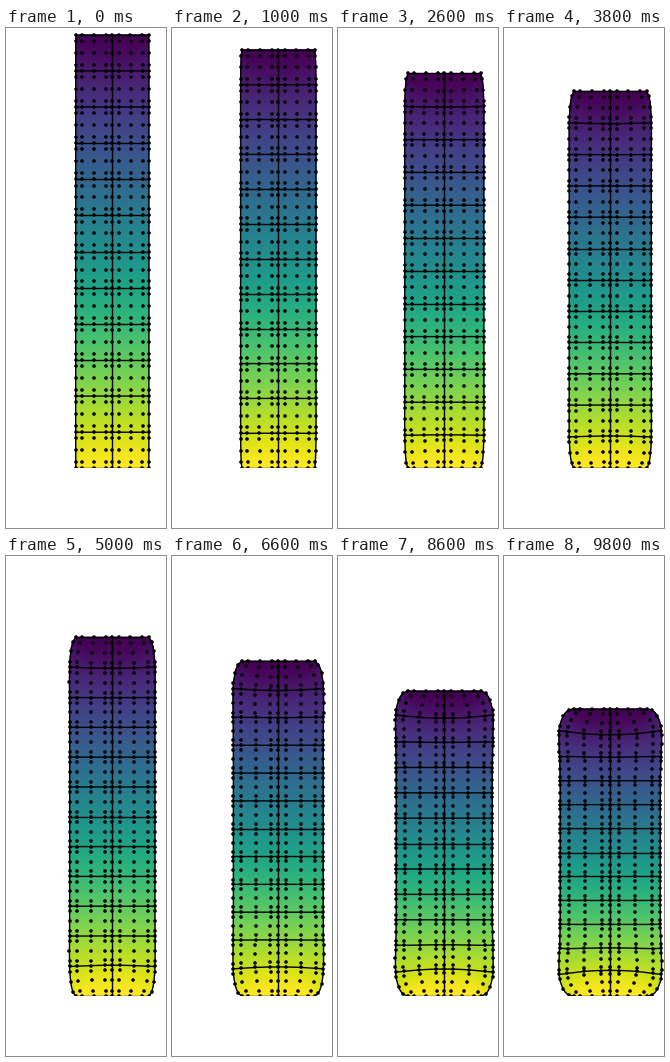
Write a matplotlib script that moves like this. It is 160x500 px and loops after 10000 ms.

```python
"""Compression of a clamped neo-Hookean block, solved with quartic spectral elements."""
import numpy as np
import matplotlib.pyplot as plt
from matplotlib.animation import FuncAnimation

W, H, DPI = 160, 500, 100
FRAMES, INTERVAL = 50, 200
CLIP = 440                       # bottom edge of the visible area
CX, BASE = 106.3, 440.4          # block axis and foot, in pixels
UNIT = 436.7 / 12                # pixels per element
STEP = 2.98 / UNIT               # plate travel per frame
ROWS = 6                         # elements in the quarter model
MU, LAM = 1.0, 9.0               # Poisson ratio 0.45
SUB = 8                          # drawing subdivisions per element

LOBATTO = np.array([-1, -np.sqrt(3 / 7), 0, np.sqrt(3 / 7), 1])
COEF = np.linalg.inv(np.vander(LOBATTO))


def basis(t):
    return np.vander(t, 5) @ COEF


def basis_slope(t):
    powers = np.arange(4, 0, -1)
    return (np.vander(t, 4) * powers) @ COEF[:4]


def refine(n):
    """Matrix from nodal values to evenly spaced values over n elements."""
    m = np.zeros((n * SUB + 1, 4 * n + 1))
    block = basis(np.linspace(-1, 1, SUB + 1))
    for e in range(n):
        m[e * SUB:(e + 1) * SUB + 1, 4 * e:4 * e + 5] = block
    return m


def mirror(a, axis, sign):
    a = np.moveaxis(a, axis, 0)
    full = np.concatenate([sign * a[:0:-1], a])
    return np.moveaxis(full, 0, axis)


# Quarter model: one element wide, ROWS elements high
xs = (LOBATTO + 1) / 2
ys = np.append((np.arange(ROWS)[:, None] + xs[:-1]).ravel(), ROWS)
X, Y = np.meshgrid(xs, ys)
NODES = X.size
conn = np.arange(25) + 20 * np.arange(ROWS)[:, None]
dofs = (2 * conn[:, :, None] + np.arange(2)).reshape(ROWS, 50)

gp, gw = np.polynomial.legendre.leggauss(5)
N, D = basis(gp), 2 * basis_slope(gp)
GRAD = np.stack([np.einsum('pj,qi->pqji', N, D).reshape(25, 25),
                 np.einsum('pj,qi->pqji', D, N).reshape(25, 25)], axis=-1)
WGT = np.outer(gw, gw).ravel() / 4
EYE = np.eye(2)

clamped = Y == ROWS
fixed = np.stack([(X == 0) | clamped, (Y == 0) | clamped], axis=-1)
free = np.flatnonzero(~fixed.ravel())


def assemble(u):
    F = EYE + np.einsum('eai,qaj->eqij', u[conn], GRAD)
    inv = np.linalg.inv(F)
    log_j = np.log(np.linalg.det(F))[..., None, None]
    stress = MU * F + (LAM * log_j - MU) * np.swapaxes(inv, -1, -2)
    c = (MU - LAM * log_j)[..., None, None]
    tangent = (MU * np.einsum('ik,jl->ijkl', EYE, EYE)
               + c * np.einsum('eqjk,eqli->eqijkl', inv, inv)
               + LAM * np.einsum('eqji,eqlk->eqijkl', inv, inv))
    force = np.einsum('q,qaj,eqij->eai', WGT, GRAD, stress, optimize=True)
    stiff = np.einsum('q,qaj,eqijkl,qbl->eaibk', WGT, GRAD, tangent, GRAD,
                      optimize=True)
    r = np.zeros(2 * NODES)
    K = np.zeros((2 * NODES, 2 * NODES))
    for e, d in enumerate(dofs):
        r[d] += force[e].ravel()
        K[np.ix_(d, d)] += stiff[e].reshape(50, 50)
    return r, K


def solve_path():
    """Nodal displacements for every frame."""
    prev = np.zeros((NODES, 2))
    u = np.zeros((NODES, 2))
    u[:, 1] = -STEP / 2 * Y.ravel() / ROWS
    path = []
    for _ in range(FRAMES):
        for _ in range(8):
            r, K = assemble(u)
            du = np.linalg.solve(K[np.ix_(free, free)], -r[free])
            u.reshape(-1)[free] += du
            if np.abs(du).max() < 1e-8:
                break
        path.append(u.copy())
        prev, u = u, 2 * u - prev
    return path


PATH = solve_path()
RX, RY = refine(2), refine(2 * ROWS)

fig = plt.figure(figsize=(W / DPI, H / DPI), dpi=DPI, facecolor='white')
ax = fig.add_axes([0, 1 - CLIP / H, 1, CLIP / H])
ax.set_xlim(0, W)
ax.set_ylim(CLIP, 0)
ax.set_axis_off()
ax.autoscale(False)
PX = 72 / DPI
DOT = 3.6 * PX


def draw(i):
    for art in list(ax.collections) + list(ax.lines):
        art.remove()
    travel = (i + 1) * STEP
    ux, uy = PATH[i].T.reshape(2, *X.shape)
    x = mirror(mirror(X + ux, 1, -1), 0, 1)
    y = mirror(mirror(Y + uy, 1, 1), 0, -1)
    shift = mirror(mirror(uy, 1, 1), 0, -1) - travel / 2

    x = CX + UNIT * x
    y = BASE - UNIT * (y + ROWS - travel / 2)
    fx, fy, fc = (RY @ a @ RX.T for a in (x, y, shift))

    ax.pcolormesh(fx, fy, fc, shading='gouraud', cmap='viridis',
                  vmin=-travel, vmax=0, zorder=1)
    line = dict(color='black', lw=1.4 * PX, zorder=2)
    ax.plot(fx[::SUB].T, fy[::SUB].T, **line)
    ax.plot(fx[:, ::SUB], fy[:, ::SUB], **line)
    # One size per dot keeps the renderer from moving dots to pixel centres
    ax.scatter(np.floor(x + 0.5), np.floor(y + 0.5),
               s=np.full(x.size, DOT ** 2), color='black', lw=0, zorder=3)
    return []


anim = FuncAnimation(fig, draw, frames=FRAMES, interval=INTERVAL,
                     init_func=lambda: [], repeat=True, repeat_delay=0)
plt.show()
```
